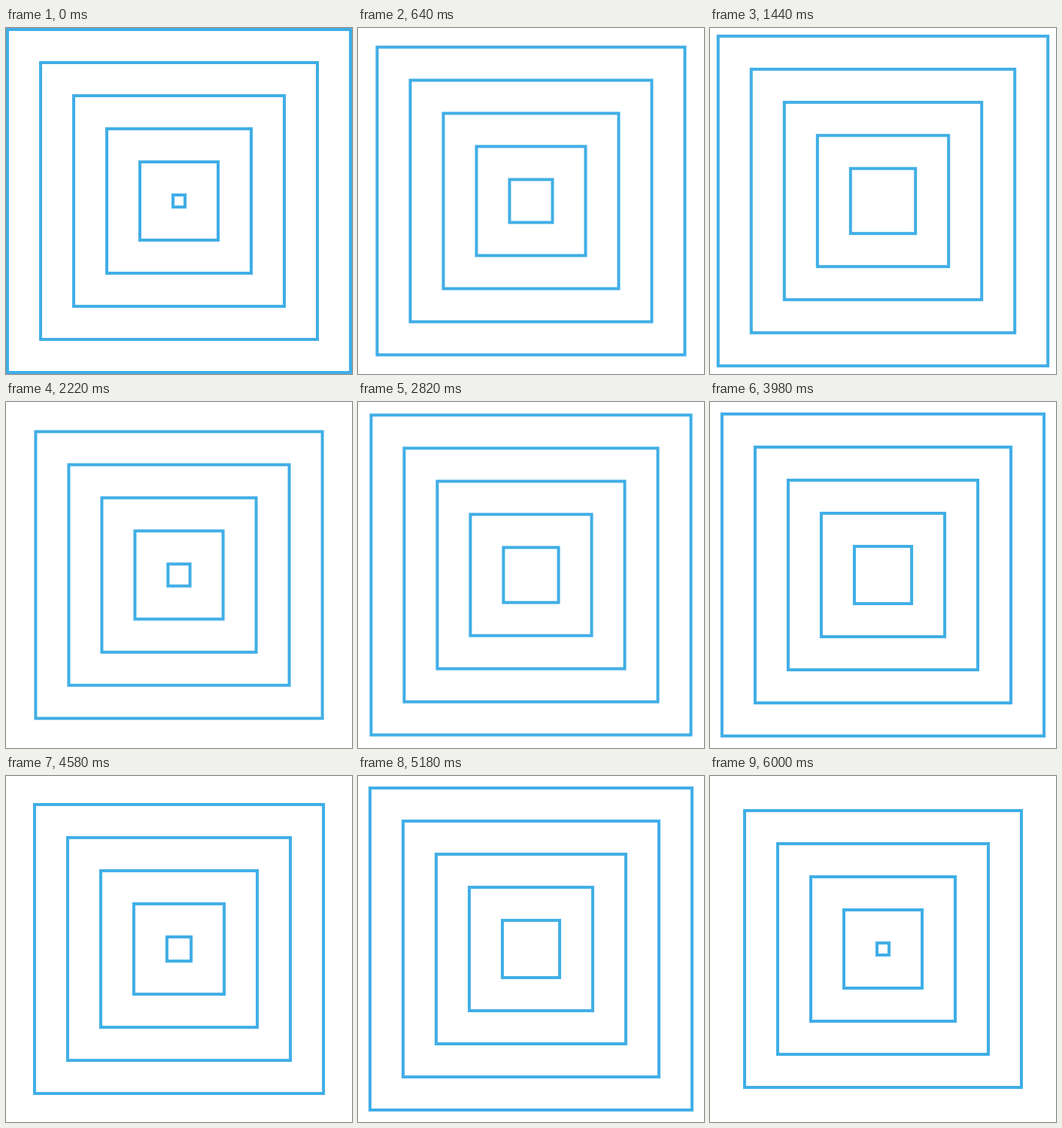
An HTML page with a canvas that plays this animation: 460 px wide and 460 px high, repeating every 6.02 s.

```html
<!DOCTYPE html>
<html>
<head>
<meta charset="utf-8">
<title>Shrinking squares</title>
<style>
  html, body { margin: 0; width: 100%; height: 100%; overflow: hidden; background: #fff; }
  canvas { display: block; }
</style>
</head>
<body>
<canvas id="stage" width="460" height="460"></canvas>
<script>
const ctx = document.getElementById('stage').getContext('2d');
const LOOP = 6020, STEP = 20, LIFE = 6000, GAP = 1200;
const START = 456, END = 16;

function draw(t) {
  ctx.fillStyle = '#fff';
  ctx.fillRect(0, 0, 460, 460);
  ctx.strokeStyle = '#40aee6';
  ctx.lineWidth = 4;
  // A square is born every GAP ms; the last one starts before the loop ends.
  for (let i = -5; i < 5; i++) {
    const age = t - i * GAP;
    if (age < 0 || age > LIFE) continue;
    const size = START + (END - START) * age / LIFE;
    ctx.strokeRect(230 - size / 2, 230 - size / 2, size, size);
  }
}

function tick() {
  const t = performance.now() % LOOP;
  draw(Math.floor(t / STEP) * STEP);
  requestAnimationFrame(tick);
}
tick();
</script>
</body>
</html>
```
